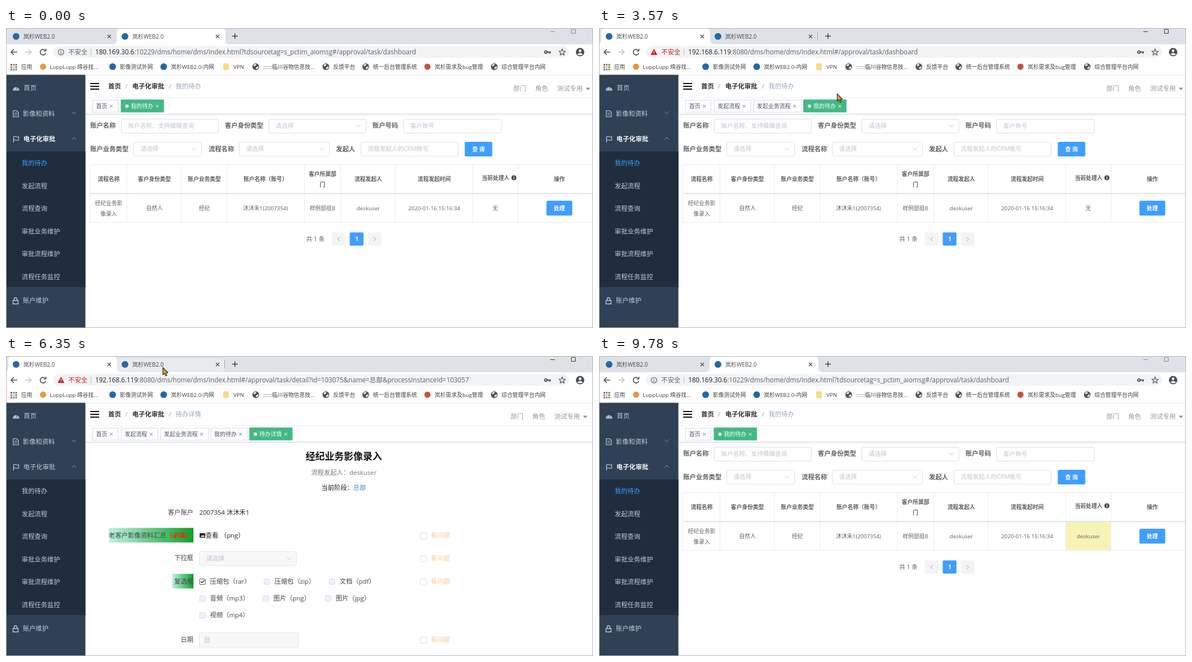
Recreate the animation shown at these times as an HTML page. Size 1046x535 px, loop 9860 ms.

```html
<!DOCTYPE html>
<html lang="zh-CN">
<head>
<meta charset="utf-8">
<title>流程审批</title>
<style>
html, body { margin: 0; width: 100%; height: 100%; overflow: hidden; background: #fff; }
svg { display: block; width: 100vw; height: 100vh; }
text { font-family: "Open Sans", "Noto Sans CJK SC", "Noto Sans CJK", sans-serif; white-space: pre; }
.off { display: none; }
</style>
</head>
<body>
<svg id="stage" viewBox="0 0 1046 535"></svg>
<script>
const LOOP = 9860;
const GREY = '#606266', HINT = '#c0c4cc', BLUE = '#409eff', LINE = '#ebeef5';
const MID = 'text-anchor="middle"', END = 'text-anchor="end"', BOLD = 'font-weight="700"';
const USER = 'deskuser', CLIENT = '沐沐禾1', ACCOUNT = '2007354', SITE = '岚杉WEB2.0';

// Text is placed by its vertical centre.
const text = (x, cy, s, size = 11.4, fill = GREY, extra = '') =>
  `<text x="${x}" y="${(cy + size * .37).toFixed(2)}" font-size="${size}" fill="${fill}" ${extra}>${s}</text>`;
const rect = (x, y, w, h, fill, extra = '') =>
  `<rect x="${x}" y="${y}" width="${w}" height="${h}" fill="${fill}" ${extra}/>`;
const box = (x, y, w, h, fill, stroke, r = 3) =>
  rect(x + .5, y + .5, w - 1, h - 1, fill, `stroke="${stroke}" rx="${r}"`);
const dot = (x, y, r, fill, extra = '') => `<circle cx="${x}" cy="${y}" r="${r}" fill="${fill}" ${extra}/>`;
const line = (d, stroke, w = 1, extra = '') =>
  `<path d="${d}" fill="none" stroke="${stroke}" stroke-width="${w}" ${extra}/>`;
const group = (id, body, off = false) => `<g id="${id}" class="${off ? 'off' : ''}">${body}</g>`;
const cross = (x, y, r, stroke, w = 1) =>
  line(`M${x - r} ${y - r}l${2 * r} ${2 * r}m0 ${-2 * r}l${-2 * r} ${2 * r}`, stroke, w);
const chevron = (x, y, stroke, dir = 1) => line(`M${x - 4} ${y - 2 * dir}l4 ${4 * dir}l4 ${-4 * dir}`, stroke);
const globe = x => dot(x, 69, 6, '#50545a') +
  `<path d="M${x - 4} 66q3-3 5-1q-1 3-4 3zM${x} 71q3-3 5-2q-1 4-4 4z" fill="#fff"/>`;

// ---- browser chrome ----
const tabShape = x => `<path d="M${x - 7} 29q7 0 7-7V8q0-7 7-7H${x + 187}q7 0 7 7v14q0 7 7 7z" fill="#fff"/>`;
const tabLabel = x => dot(x + 6, 15, 6, '#2468a8') + text(x + 19, 15, SITE, 10.1, '#45494d');

function chrome() {
  const marks = [
    [203, '影像测试外网'], [294, SITE + '-内网'], [405, 'VPN'], [458, '::::::临川谷物信息技...'],
    [583, '反馈平台'], [654, '统一后台管理系统'], [764, '岚杉需求及bug管理'], [883, '综合管理平台内网'],
    [27, '应用'], [78, 'LuppLupp 绵谷找...'],
  ];
  let apps = '';
  const hues = ['#e8453c', '#f9bb2d', '#3aa757', '#4688f1'];
  for (let i = 0; i < 9; i++) apps += rect(8 + i % 3 * 4.3, 64 + (i / 3 | 0) * 4.3, 3, 3, hues[(i * 3 + (i / 3 | 0)) % 4]);
  return rect(0, 0, 1046, 29, '#dee1e6') +
    group('hoverLeft', rect(4, 4, 191, 25, '#eceef1', 'rx="6"'), true) +
    group('hoverRight', rect(198, 4, 191, 25, '#e8ebee', 'rx="6"'), true) +
    group('tabLeft', tabShape(4) + line('M389.5 8v14', '#9aa0a6'), true) +
    group('tabRight', tabShape(197)) +
    tabLabel(12) + tabLabel(206) +
    cross(184, 15, 3, '#4a4d51', 1.3) + cross(377, 15, 3, '#4a4d51', 1.3) +
    line('M403 14.5h10M408 9.5v10', '#3c4043', 1.5) +
    `<g id="controls" stroke="#777">${line('M970 6.5h8M1007.5 2.5h7v7h-7z', 'inherit')}</g>` +
    rect(0, 29, 1046, 55, '#fff') +
    line('M20 43H9m5-5l-5 5l5 5', '#4a4e52', 1.6) + line('M34 43h11m-5-5l5 5l-5 5', '#c2c5c9', 1.6) +
    line('M69.5 39.5a5 5 0 1 0 1.3 5M71 37v4h-4', '#4a4e52', 1.6) +
    rect(84, 32, 919, 21, '#f1f3f4', 'id="omni" rx="10.5"') +
    group('safe', dot(98, 43, 5, 'none', 'stroke="#5f6368" stroke-width="1.2"') +
      line('M98 42v4M98 39.6v1.2', '#5f6368', 1.3) + text(111, 43, '不安全', 11.4, '#5f6368')) +
    group('unsafe', '<path d="M98 37l6 11H92z" fill="#c5221f"/>' +
      line('M98 41v3.5M98 45.5v1.2', '#fff', 1.1) + text(111, 43, '不安全', 11.4, '#c5221f'), true) +
    line('M151.5 37v12', '#bdc1c6') +
    `<text x="159" y="47" font-size="11.7" fill="#5f6368"><tspan id="host" fill="#202124"></tspan><tspan id="path"></tspan></text>` +
    dot(962, 43, 2.2, 'none', 'stroke="#4a4e52" stroke-width="1.8"') + line('M964 43h7m-2 0v3', '#4a4e52', 1.8) +
    line('M991 37.5l1.6 3.8 4 .3-3.1 2.6 1 4-3.5-2.2-3.5 2.2 1-4-3.1-2.6 4-.3z', '#4a4e52', 1.2) +
    dot(1023, 43, 7.5, '#4a4e52') + dot(1023, 40.7, 2.4, '#fff') + '<path d="M1018 47q5-5 10 0q-5 3-10 0z" fill="#fff"/>' +
    apps + dot(66, 69, 5.5, '#e39a45') + dot(190, 69, 6, '#2468a8') + dot(281, 69, 6, '#2468a8') +
    rect(387, 63, 10, 12, '#fbd98c', 'rx="1"') + dot(751, 69, 5.5, '#c5513c') +
    [445, 570, 641, 870].map(globe).join('') +
    marks.map(([x, s]) => text(x, 69, s, 9.8, '#3c4043')).join('') +
    line('M0 83.5H1046', '#e0e2e5');
}

// ---- app frame ----
const SIDE = '#bfcbd9';
const subItems = ['我的待办', '发起流程', '流程查询', '审批业务维护', '审批流程维护', '流程任务监控'];

function sidebar() {
  return rect(1, 83.5, 140.5, 451.5, '#304156') + rect(1, 220, 140.5, 242, '#1f2d3d') +
    `<path d="M12 111.500a6 6 0 1 1 12 0z" fill="${SIDE}"/>` + line('M18 110l2-4M14 109h1.500M21 109h1.500', '#304156') +
    text(31.5, 107, '首页', 11.4, SIDE) +
    line('M13 147.500h6l3 3v8h-9zM15 152h5M15 155h5', SIDE, 1.2) + text(30, 153, '影像和资料', 11.4, SIDE) + chevron(121, 151, '#8492a3') +
    line('M13.500 193v11M13.500 194q3-1 5 0t4 0v6q-2 1-4 0t-5 0', SIDE, 1.2) +
    text(31, 198, '电子化审批', 11.4, SIDE, 'id="section"') + chevron(121, 197, '#8492a3', -1) +
    subItems.map((s, i) => text(28, 241 + i * 40.5, s, 11.4, i ? SIDE : BLUE, i ? '' : 'id="todo"')).join('') +
    line('M12.500 486h9v6h-9zM14.500 486v-2.500a2.500 2.500 0 0 1 5 0v2.500', SIDE, 1.3) + text(30, 486, '账户维护', 11.4, SIDE);
}

const tag = (x, s) => {
  const w = s.length * 10 + 26;
  return box(x, 128, w, 22.5, '#fff', '#d8dce5', 0) + text(x + 6.5, 139.5, s, 10, '#495060') + cross(x + w - 12.5, 139.5, 2.5, '#6c727c');
};
const activeTag = (x, s) => rect(x - .5, 127.5, 77, 23, '#42b983') + dot(x + 10.5, 139.5, 3, '#fff') +
  text(x + 17.5, 139.5, s, 10, '#fff') + cross(x + 64.5, 139.5, 2.5, '#fff');

function header() {
  const crumb = '#97a8be';
  return line('M150 99h16M150 104h16M150 109h16', '#111', 2) +
    text(182, 104, '首页', 11.4, '#303133', BOLD) + text(212, 104, '/', 11.4, HINT, BOLD) +
    text(225, 104, '电子化审批', 11.4, '#303133', BOLD) + text(290, 104, '/', 11.4, HINT, BOLD) +
    text(302, 104, '我的待办', 11.4, crumb, 'id="crumb"') +
    group('account', text(904, 108, '部门', 11.4, '#999') + text(943, 108, '角色', 11.4, '#999') +
      text(982, 108, '测试专用', 11.4, '#999') + '<path d="M1033 106.5h8l-4 4z" fill="#888"/>') +
    line('M142 124.5H1045', '#f0f1f4') + line('M142 153.5H1045', '#d3d7df') + line('M142 154.5H1045', '#f0f2f5') +
    tag(154, '首页') +
    group('tagsOwn', activeTag(205, '我的待办')) +
    group('tagsMore', tag(205, '发起流程') + tag(275, '发起业务流程'), true) +
    group('tagsList', activeTag(364.5, '我的待办'), true) +
    group('tagsDetail', tag(364.5, '我的待办') + activeTag(434, '待办详情'), true);
}

// ---- to-do list ----
const label = (x, y, s) => text(x, y, s, 11.4, GREY, BOLD);
const field = (x, y, w, hint, pick) => box(x, y - 12.5, w, 26, '#fff', '#dcdfe6') +
  text(x + 12.5, y, hint, 10.7, HINT) + (pick ? chevron(x + w - 14, y, HINT) : '');

function listPage() {
  const edges = [150, 216, 313, 394, 532, 597, 694, 832, 913];
  const mids = [183, 264.5, 353.5, 462.5, 564, 645.5, 763, 872, 986];
  const heads = ['流程名称', '客户身份类型', '账户业务类型', '账户名称（账号）', '', '流程发起人', '流程发起时间', '', '操作'];
  const cells = ['', '自然人', '经纪', `${CLIENT}(${ACCOUNT})`, '样例部组B', USER, '2020-01-16 15:16:34', '', ''];
  const head = (x, y, s) => text(x, y, s, 9.8, '#5a5d63', `${MID} ${BOLD}`);
  const cell = (x, y, s, extra = '') => text(x, y, s, 9.8, GREY, `${MID} ${extra}`);
  return label(150, 174, '账户名称') + field(205, 174.5, 174, '账户名称、支持模糊查询') +
    label(390, 174, '客户身份类型') + field(468, 174.5, 174, '请选择', true) +
    label(653, 174, '账户号码') + field(708, 174.5, 175, '客户账号') +
    label(150, 215.5, '账户业务类型') + field(227, 215.5, 122, '请选择', true) +
    label(361, 215.5, '流程名称') + field(415, 215.5, 162, '请选择', true) +
    label(588, 215.5, '发起人') + field(632, 215.5, 174, '流程发起人的CRM账号') +
    rect(817.5, 203, 49, 26, BLUE, 'rx="2.5"') + text(842, 216, '查 询', 10, '#fff', `${MID} ${BOLD}`) +
    rect(150, 296, 895, 51, '#fff', 'id="row"') +
    group('mark', rect(832, 296, 81, 51, '#f6f4b4'), true) +
    line('M150 243.5H1045M150 346.5H1045' + edges.map(x => `M${x - .5} 244V347`).join(''), LINE) +
    line('M150 295.3H1045', '#dcdee2', 1.5) +
    heads.map((s, i) => head(mids[i], 269, s)).join('') + head(564, 260, '客户所属部') + head(564, 279, '门') +
    head(872.5, 267, '当前处理人') + dot(905, 267, 4.5, '#44474c') + line('M905 266v3.5M905 263.7v1.3', '#fff', 1.3) +
    cells.map((s, i) => cell(mids[i], 321, s)).join('') + cell(183, 312, '经纪业务影') + cell(183, 331, '像录入') +
    cell(872, 321, '无', 'id="handler"') +
    rect(963, 308, 46, 26.5, BLUE, 'rx="2.5" id="handle"') + text(986, 321, '处理', 10, '#fff', `${MID} ${BOLD}`) +
    text(535, 376.5, '共 1 条', 10.6) +
    rect(580.5, 364.5, 24.5, 23.5, '#f4f4f5', 'rx="2"') + line('M595 373l-4 3.5l4 3.5', HINT, 1.2) +
    rect(612.5, 364.5, 24.5, 23.5, BLUE, 'rx="2"') + text(625, 376.5, '1', 10.6, '#fff', `${MID} ${BOLD}`) +
    rect(644.5, 364.5, 24.5, 23.5, '#f4f4f5', 'rx="2"') + line('M655 373l4 3.5l-4 3.5', HINT, 1.2);
}

// ---- task detail ----
function detailPage() {
  const INK = '#404246';
  const right = (y, s) => text(334, y, s, 11.4, INK, END);
  const shade = (x, y) => rect(x, y, 334 - x, 26, 'url(#green)');
  const check = (x, y, s) => box(x - 5.5, y - 5, 11, 11, '#edf2fc', '#d3dbe8', 1.5) + text(x + 13.5, y, s, 11.4, INK);
  const issue = y => box(738, y - 5, 12, 12, '#fff', '#dcdfe6', 1.5) + text(757, y, '有问题', 11.4, '#f7c898');
  return '<defs><linearGradient id="green"><stop stop-color="#bdf3e0"/><stop offset="1" stop-color="#0f9f2c"/></linearGradient></defs>' +
    text(602, 179, '经纪业务影像录入', 17, '#111', `${MID} ${BOLD}`) +
    text(602, 208, '流程发起人：' + USER, 11.4, '#777', MID) +
    text(562, 235, '当前阶段：', 11.4, '#222') + text(618.5, 235, '总部', 11.4, '#3a8fd0') +
    right(279, '客户账户') + text(344.5, 279, `${ACCOUNT} ${CLIENT}`, 11.4, '#222') +
    shade(183, 306.5) + text(183, 320, '老客户影像资料汇总<tspan fill="#f0280a" font-weight="700">（必填）</tspan>', 11.4, INK) +
    rect(345, 316, 10, 8, '#222', 'rx="1"') + '<path d="M346.5 322.5l2.5-3 1.5 1.5 1.5-2 2 3.5z" fill="#fff"/>' +
    text(355.5, 320, '查看', 11.4, '#222') + text(382, 320, '（png）', 11.4, '#222') +
    right(360, '下拉框') + box(344, 348, 174, 26, '#f8f8f9', '#e4e6ea') + text(357, 360.5, '请选择', 10.8, HINT) + chevron(504.5, 361, HINT) +
    shade(296, 388.5) + right(402, '复选框') +
    check(350, 402, '压缩包（rar）') + box(344.5, 397, 11, 11, '#fff', '#555', 1.5) + line('M347 402l2.3 2.6L353.5 399.5', '#222', 1.3) +
    check(465, 402, '压缩包（zip）') + check(581, 402, '文档（pdf）') +
    check(350, 432, '音频（mp3）') + check(463, 432, '图片（png）') + check(574, 432, '图片（jpg）') +
    check(350, 462, '视频（mp4）') +
    right(506, '日期') + box(344, 493, 178, 27, '#f8f8f9', '#e4e6ea') +
    line('M354.5 502.5h8v8h-8zM354.5 505.5h8M356.5 501v2M360.5 501v2M356 508h5', HINT) +
    [320, 360.5, 402, 506].map(issue).join('');
}

const pointer =
  group('arrow', '<path id="arrowShape" d="M.5 .5V13.5L3.4 10.9L5.4 15.4L7.6 14.4L5.6 10H9.6Z" fill="#e3a03a" stroke="#2b2416" stroke-width="1.1" stroke-linejoin="round"/>') +
  group('hand', '<path d="M-1.5 1q1.5-2 3 0v5q6 0 7 2.5v4q-1 2-1.5 4.5H.5q-1-3-4.5-6.5q.5-2.5 2.5-.5z" fill="#f4c32d" stroke="#2b2416" stroke-width="1.1"/>' +
    line('M3.5 7v3M6 7.5v2.5', '#2b2416'), true);

const stage = document.getElementById('stage');
stage.innerHTML = rect(0, 0, 1046, 535, '#fff') + chrome() + sidebar() + header() +
  group('list', listPage()) + group('detail', detailPage(), true) +
  box(0, 0, 1046, 535, 'none', '#b4b6b9', 0) + group('cursor', pointer, true);

const el = {};
stage.querySelectorAll('[id]').forEach(n => el[n.id] = n);

// Pointer moves: start, end, number of steps, then the points passed.
const START = [622, 461];
const moves = [
  [150, 850, 10, [872, 314]],
  [1170, 1780, 9, [149, 13]],
  [2790, 3100, 5, [157, 18], [152, 18]],
  [3250, 4200, 13, [976, 318]],
  [5290, 6200, 13, [985, 345], [300, 56]],
  [6300, 6350, 2, [279, 20]],
  [7140, 7530, 6, [838, 308]],
  [7600, 7770, 3, [848, 316]],
  [8000, 8320, 5, [875, 382]],
  [8490, 8540, 2, [875, 365]],
  [9030, 9400, 6, [272, 540]],
];
const ease = u => u * u * (3 - 2 * u);

function pointerAt(t) {
  let from = START;
  for (const [t0, t1, steps, ...points] of moves) {
    if (t < t0) return from;
    const k = Math.floor((t - t0) / (t1 - t0) * (steps - 1) + 1e-6) + 1;
    if (k < steps) {
      const way = [from, ...points];
      // A first turning point takes only a short part of the move.
      let u = k / steps, i = 0;
      if (points.length > 1) {
        i = u > .25 ? 1 : 0;
        u = i ? (u - .25) / .75 : u / .25;
      }
      u = ease(u);
      return [0, 1].map(a => way[i][a] + (way[i + 1][a] - way[i][a]) * u);
    }
    from = points[points.length - 1];
  }
  return from;
}

const show = (id, on) => el[id].classList.toggle('off', !on);
const paint = (id, fill) => el[id].setAttribute('fill', fill);
const write = (id, s) => { if (el[id].textContent !== s) el[id].textContent = s; };
const clamp = u => Math.max(0, Math.min(1, u));

function draw(t) {
  const outer = t < 2330 || t >= 6670;
  const detail = t >= 4510 && t < 6670;
  const done = t >= 6670;
  const [x, y] = pointerAt(t);
  const seen = t >= 150 && t < 9400;
  const within = (l, top, r, b) => seen && x >= l && x < r && y >= top && y < b;

  show('tabRight', outer); show('tabLeft', !outer);
  show('hoverLeft', outer && within(0, 2, 197, 29));
  show('hoverRight', !outer && within(197, 2, 390, 29));
  show('safe', outer); show('unsafe', !outer);
  el.controls.setAttribute('stroke', t < 2330 || t >= 9780 ? '#8a8c90' : '#333');
  paint('omni', within(84, 32, 1003, 53) ? '#e8eaed' : '#f1f3f4');
  write('host', outer ? '180.169.30.6' : '192.168.6.119');
  write('path', outer ? ':10229/dms/home/dms/index.html?tdsourcetag=s_pctim_aiomsg#/approval/task/dashboard'
    : ':8080/dms/home/dms/index.html#/approval/task/' +
      (detail ? 'detail?id=103075&name=总部&processInstanceId=103057' : 'dashboard'));

  paint('todo', detail ? SIDE : BLUE);
  paint('section', detail ? SIDE : '#f4f4f5');
  el.section.setAttribute('font-weight', detail ? 400 : 700);
  write('crumb', detail ? '待办详情' : '我的待办');
  el.account.setAttribute('transform', `translate(${detail ? -5 : 0} 0)`);
  show('tagsOwn', outer); show('tagsMore', !outer);
  show('tagsList', !outer && !detail); show('tagsDetail', detail);

  const leave = detail ? clamp((t - 4510) / 110) : 0;
  const enter = clamp((t - 4600) / 130);
  show('list', leave < 1); el.list.setAttribute('opacity', 1 - leave);
  show('detail', detail && enter > 0); el.detail.setAttribute('opacity', enter);
  el.detail.setAttribute('transform', `translate(${-24 * (1 - ease(enter))} 0)`);

  const onRow = !detail && within(150, 296, 1045, 347) && !(t >= 7530 && t < 7600);
  const onButton = !detail && within(963, 308, 1009, 334);
  paint('row', onRow ? '#f5f7fa' : '#fff');
  paint('handle', onButton ? '#519ff2' : BLUE);
  show('mark', done);
  write('handler', done ? USER : '无');

  show('cursor', seen); show('hand', onButton); show('arrow', !onButton);
  el.cursor.setAttribute('transform', `translate(${Math.round(x)} ${Math.round(y)})`);
  const marked = done && within(832, 296, 913, 347);
  paint('arrowShape', marked ? '#ee9a5c' : '#e3a03a');
  el.arrowShape.setAttribute('stroke', marked ? '#35a83a' : '#2b2416');
}

const begin = performance.now();
function tick() {
  draw((performance.now() - begin) % LOOP);
  requestAnimationFrame(tick);
}
tick();
</script>
</body>
</html>
```
